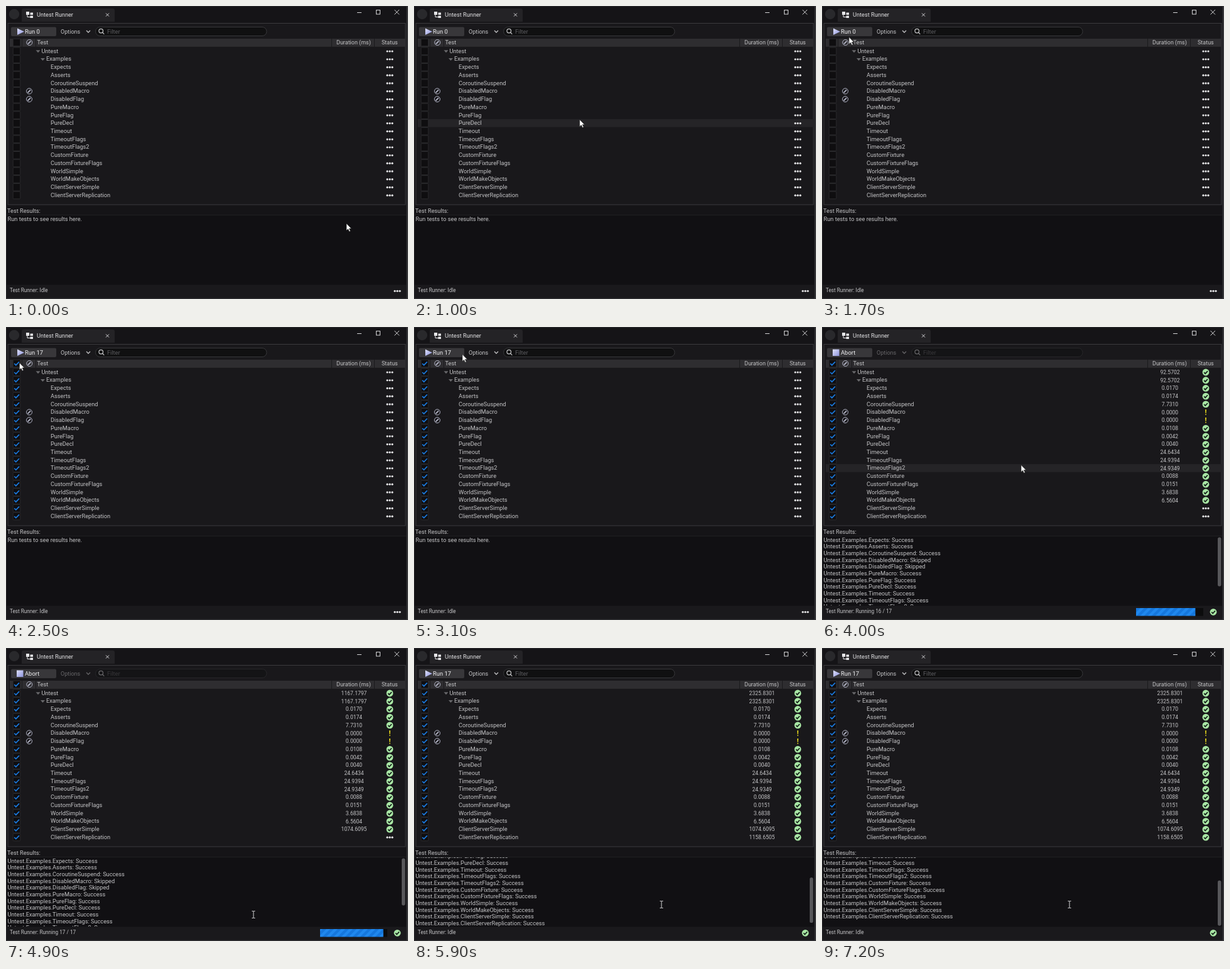
These frames come from a looping animation (640 by 466 pixels, 7.3 s). An HTML page:

```html
<!DOCTYPE html>
<html lang="en">
<head>
<meta charset="utf-8">
<title>Untest Runner</title>
<style>
html, body { margin: 0; width: 100%; height: 100%; overflow: hidden; background: #0b0b0c; }
svg { display: block; width: 640px; height: 466px; font: 9.23px Roboto, sans-serif; fill: #c4c4c6; }
text { white-space: pre; }
</style>
</head>
<body>
<svg id="stage" viewBox="0 0 640 466">
  <defs>
    <linearGradient id="lav" x1="0" y1="0" x2="1" y2="1">
      <stop offset="0" stop-color="#e0e2fb"/><stop offset="1" stop-color="#8c92dc"/>
    </linearGradient>
    <pattern id="stripes" width="12" height="12" patternUnits="userSpaceOnUse">
      <rect width="12" height="12" fill="#1577dd"/>
      <path d="M0 12L12 0H6L0 6ZM6 12H12V6Z" fill="#2088ee"/>
    </pattern>
    <clipPath id="logClip"><rect x="0" y="333" width="630" height="110"/></clipPath>
    <g id="dots" fill="#e6e6e8">
      <circle cx="-4" r="1.6"/><circle r="1.6"/><circle cx="4" r="1.6"/>
    </g>
    <g id="pass">
      <circle r="5.4" fill="#a8e6a4"/>
      <path d="M-2.8 .1L-.8 2.2L3 -1.9" fill="none" stroke="#15211a" stroke-width="1.7"/>
    </g>
    <path id="skip" d="M-.9 -4.4H.9L.6 1.4H-.6ZM-.8 2.5H.8V4.1H-.8Z" fill="#f4e41c"/>
    <g id="off" fill="none" stroke="#b4b6c8">
      <circle r="4.5"/>
      <path d="M-2.4 2.4L2.1 -2.1" stroke-width="1.9"/>
    </g>
    <rect id="box" x="-5.8" y="-5.8" width="11.6" height="11.6" rx="1" fill="#0f0e10" stroke="#303033" stroke-width=".8"/>
    <path id="tick" d="M-3.8 .2L-1.2 2.7L4 -2.6" fill="none" stroke="#1a78dc" stroke-width="1.7"/>
  </defs>

  <rect width="640" height="466" fill="#3c3c3e"/>
  <rect x=".5" y=".5" width="637.5" height="464.5" fill="#151417" stroke="#29292c"/>

  <!-- title bar -->
  <circle cx="13" cy="13" r="8.2" fill="#29292c"/>
  <path d="M25 25V7Q25 4 28 4H170Q173 4 173 7V25Z" fill="#242326"/>
  <g fill="#e6e6e8">
    <rect x="32" y="9" width="5" height="5"/><rect x="38.5" y="10.5" width="4.5" height="3.5"/>
    <rect x="38.5" y="15.5" width="4.5" height="3.5"/>
    <path d="M34 14V17.5H39" fill="none" stroke="#e6e6e8"/>
  </g>
  <text x="49" y="17.2" fill="#e2e2e4">Untest Runner</text>
  <g fill="none" stroke="#d4d4d6">
    <path d="M159 11.5L164 16.5M164 11.5L159 16.5"/>
    <path d="M559 10.5H566"/>
    <rect x="589.5" y="6.5" width="6" height="6.5"/>
    <path d="M618.5 6L626 13.5M626 6L618.5 13.5"/>
  </g>

  <!-- toolbar and list -->
  <rect x="3" y="27.5" width="633" height="288.5" fill="#19181b" stroke="#3b3b3e"/>
  <rect x="8" y="33.5" width="72" height="14.5" rx="2" fill="#38373a"/>
  <path id="play" d="M18 35.5L29 40.7L18 46Z" fill="url(#lav)"/>
  <rect id="stop" x="17" y="35.5" width="10.5" height="10.5" fill="url(#lav)"/>
  <text id="run" x="30" y="44" font-size="9.4" fill="#f2f2f4"></text>
  <g id="tools">
    <text x="87" y="44" font-size="9">Options</text>
    <path d="M128 39L131 42L134 39" fill="none" stroke="#c4c4c6" stroke-width="1.3"/>
    <rect x="142.5" y="33.5" width="272.5" height="14" rx="7" fill="#101011" stroke="#38383b"/>
    <g fill="none" stroke="#c4c4c6" stroke-width="1.2">
      <circle cx="151.2" cy="39.6" r="3.3"/><path d="M153.5 42L156.3 44.8"/>
    </g>
    <text x="161" y="43.7" fill="#5c5c60">Filter</text>
  </g>
  <rect x="6" y="52" width="630" height="12.8" fill="#2e2d30"/>
  <path d="M25.5 52V65M47.5 52V65M518.5 52V65M586.5 52V65" stroke="#1a1a1c"/>
  <use href="#off" x="37.3" y="58"/>
  <text x="49.5" y="61.4">Test</text>
  <text x="526" y="61.4" font-size="9">Duration (ms)</text>
  <text x="598" y="61.4" font-size="9">Status</text>
  <rect id="hover" x="6" width="630" height="12.7" fill="#252427"/>
  <g id="list"></g>

  <!-- results -->
  <text x="2" y="328.6">Test Results:</text>
  <rect x="1" y="333" width="636" height="110.5" fill="#111013"/>
  <path d="M1 332.5H637" stroke="#202022"/>
  <g clip-path="url(#logClip)"><g id="log"></g></g>
  <rect id="thumb" x="630" width="5.5" rx="2.7" fill="#57575a"/>
  <rect x="1" y="443.5" width="636" height="20.5" fill="#1a191c"/>
  <text id="state" x="6" y="455" font-size="8.2"></text>
  <g id="bar">
    <rect x="500" y="447" width="107" height="12.5" fill="#0c0c0d"/>
    <rect id="fill" x="500" y="447" height="12.5" fill="url(#stripes)"/>
  </g>
  <use id="total" x="623" y="453.3"/>

  <path id="arrow" d="M0 0V11L2.6 8.7L4.5 12.7L6.3 11.9L4.4 8H7.8Z" fill="#fff" stroke="#222" stroke-width=".6"/>
  <path id="beam" d="M-2.5 -5.5H-.6L0 -5L.6 -5.5H2.5M0 -5V5M-2.5 5.5H-.6L0 5L.6 5.5H2.5" fill="none" stroke="#d8d8da"/>
</svg>
<script>
const LOOP = 7300, ROW = 12.73, LINE = 10.65;
const CHECKED = 2300, START = 3150, QUICK = 14, END = 5600;
const tests = [
  ["Expects", .017], ["Asserts", .0174], ["CoroutineSuspend", 7.731],
  ["DisabledMacro", 0], ["DisabledFlag", 0], ["PureMacro", .0108],
  ["PureFlag", .0042], ["PureDecl", .004], ["Timeout", 24.6434],
  ["TimeoutFlags", 24.9394], ["TimeoutFlags2", 24.9349], ["CustomFixture", .0088],
  ["CustomFixtureFlags", .0151], ["WorldSimple", 3.6838], ["WorldMakeObjects", 6.5604],
  ["ClientServerSimple", 1074.60946], ["ClientServerReplication", 1158.65046]
];
// time, x, y
const path = [
  [0, 542, 346], [300, 542, 346], [1600, 43, 49.5], [1700, 43, 49.5], [2100, 17, 58],
  [2400, 17, 58], [3000, 77, 43.5], [3200, 77, 43.5], [3900, 317, 219.5], [4000, 317, 219.5],
  [4700, 394, 424], [4900, 394, 424], [5300, 394, 408], [LOOP, 394, 408]
];
const scrolls = [[0, 0], [5600, 0], [5850, 71.2], [5950, 71.2], [6150, 81.8], [LOOP, 81.8]];

const $ = id => document.getElementById(id);
const show = (el, on) => el.setAttribute("visibility", on ? "visible" : "hidden");
const isSkipped = name => name.startsWith("Disabled");

function add(parent, tag, attrs, text) {
  const el = document.createElementNS("http://www.w3.org/2000/svg", tag);
  for (const k in attrs) el.setAttribute(k, attrs[k]);
  if (text) el.textContent = text;
  parent.append(el);
  return el;
}

function sample(keys, t) {
  let i = 1;
  while (i < keys.length - 1 && t >= keys[i][0]) i++;
  const a = keys[i - 1], b = keys[i];
  const u = Math.min(1, (t - a[0]) / (b[0] - a[0]));
  const e = u * u * (3 - 2 * u);
  return a.slice(1).map((v, k) => v + (b[k + 1] - v) * e);
}

const list = $("list"), log = $("log");
const ticks = [];
function addBox(y) {
  add(list, "use", { href: "#box", x: 17, y });
  ticks.push(add(list, "use", { href: "#tick", x: 17, y }));
}
addBox(58);

const rows = [["Untest"], ["Examples"], ...tests].map(([name], i) => {
  const y = 71.5 + i * ROW, x = [56.5, 64][i] || 71;
  addBox(y + .3);
  if (i < 2) add(list, "path", { d: `M${x - 9} ${y - 1.2}h7l-3.5 4z`, fill: "#69696c" });
  if (isSkipped(name)) add(list, "use", { href: "#off", x: 37, y: y + .3 });
  add(list, "text", { x, y: y + 3.2 }, name);
  return {
    time: add(list, "text", { x: 554, y: y + 3.4, "font-size": 8.6, "text-anchor": "middle" }),
    icon: add(list, "use", { x: 611, y: y + .5 })
  };
});

const hint = add(log, "text", { x: 2.5, y: 341.5 }, "Run tests to see results here.");
const lines = tests.map(([name], i) =>
  add(log, "text", { x: 2.5, y: 341.7 + i * LINE },
    `Untest.Examples.${name}: ${isSkipped(name) ? "Skipped" : "Success"}`));

function doneAt(t) {
  if (t < START) return 0;
  if (t >= END) return 17;
  if (t >= START + 15 * QUICK + 1075) return 16;
  return Math.min(15, Math.floor((t - START) / QUICK));
}

function setRow(row, done, ms, name) {
  row.time.textContent = done ? ms.toFixed(4) : "";
  row.icon.setAttribute("href", !done ? "#dots" : isSkipped(name) ? "#skip" : "#pass");
}

function draw(t) {
  const done = doneAt(t), started = t >= START, running = started && t < END;
  const checked = t >= CHECKED;
  ticks.forEach(k => show(k, checked));

  const sum = tests.slice(0, done).reduce((s, x) => s + x[1], 0);
  rows.forEach((r, i) => i < 2
    ? setRow(r, done > 0, sum, "")
    : setRow(r, done > i - 2, tests[i - 2][1], tests[i - 2][0]));

  show($("play"), !running);
  show($("stop"), running);
  $("run").textContent = running ? "Abort" : checked ? "Run 17" : "Run 0";
  $("tools").setAttribute("opacity", running ? .45 : 1);

  const [scroll] = sample(scrolls, t);
  show(hint, !started);
  lines.forEach((l, i) => show(l, i < done));
  log.setAttribute("transform", `translate(0 ${-scroll})`);
  show($("thumb"), done > 10);
  $("thumb").setAttribute("y", 334.5 + scroll * .43);
  $("thumb").setAttribute("height", 78 - 3 * (done - 15));

  $("state").textContent = "Test Runner: " + (running ? `Running ${Math.min(17, done + 1)} / 17` : "Idle");
  show($("bar"), running);
  $("fill").setAttribute("width", 107 * done / 17);
  $("stripes").setAttribute("patternTransform", `translate(${t * .03 % 12} 0)`);
  $("total").setAttribute("href", done ? "#pass" : "#dots");

  const [x, y] = sample(path, t);
  const typing = started && y > 333;
  show($("arrow"), !typing);
  show($("beam"), typing);
  for (const id of ["arrow", "beam"]) $(id).setAttribute("transform", `translate(${x} ${y})`);
  const over = Math.floor((y - 65.3) / ROW);
  show($("hover"), over >= 0 && over < rows.length);
  $("hover").setAttribute("y", 65.3 + over * ROW);
}

const begin = performance.now();
function tick() {
  const t = (performance.now() - begin) % LOOP;
  draw(Math.floor(t / 100) * 100);
  requestAnimationFrame(tick);
}
tick();
</script>
</body>
</html>
```
